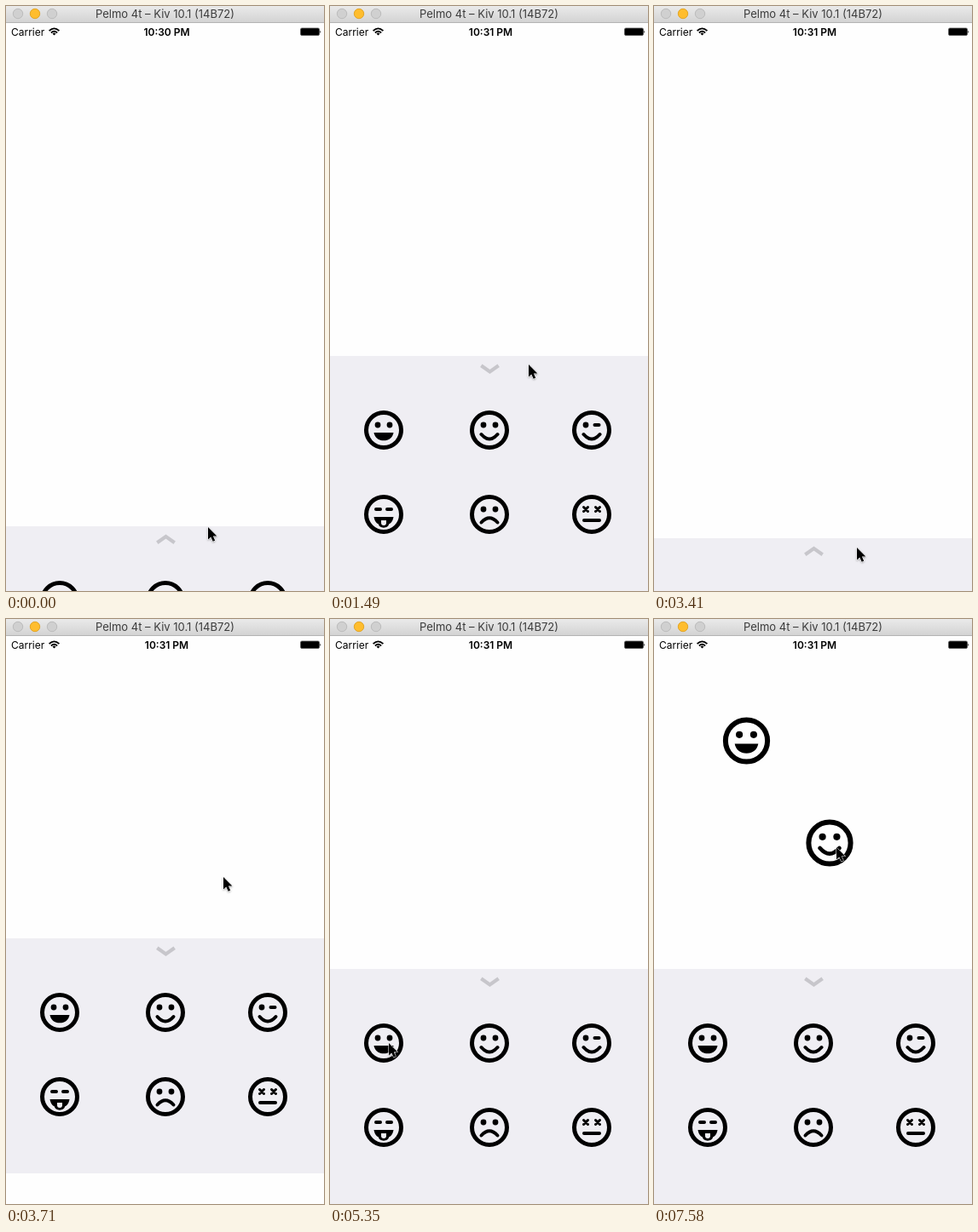
Animation of 373 by 687 pixels, one loop 8000 ms. Source, as an HTML page:

```html
<!DOCTYPE html>
<html lang="en">
<head>
<meta charset="utf-8">
<title>Sticker tray</title>
<style>
  html, body { margin: 0; width: 100%; height: 100%; overflow: hidden; background: #fefefe; }
  svg { display: block; width: 100%; height: 100%; }
  text { font-family: Inter, Roboto, sans-serif; font-size: 12px; }
  .line { fill: none; stroke: #000; stroke-width: 4; stroke-linecap: round; }
</style>
</head>
<body>
<svg viewBox="0 0 373 687">
  <defs>
    <linearGradient id="bar" x2="0" y2="1">
      <stop offset="0" stop-color="#eaeaea"/>
      <stop offset="1" stop-color="#d2d2d2"/>
    </linearGradient>
    <filter id="shadow" x="-50%" y="-50%" width="200%" height="200%">
      <feDropShadow dx="0" dy="1" stdDeviation=".8" flood-opacity=".35"/>
    </filter>

    <circle id="ring" r="20.5" fill="none" stroke="#000" stroke-width="5"/>
    <g id="eyes"><circle cx="-7" cy="-6" r="3.4"/><circle cx="7" cy="-6" r="3.4"/></g>
    <path id="smile" class="line" d="M-9.5 5Q0 16 9.5 5"/>

    <g id="grin"><use href="#ring"/><use href="#eyes"/><path d="M-11.5 3H11.5C10.5 9 6 12.3 0 12.3S-10.5 9-11.5 3Z"/></g>
    <g id="happy"><use href="#ring"/><use href="#eyes"/><use href="#smile"/></g>
    <g id="wink"><use href="#ring"/><circle cx="-7" cy="-6" r="3.4"/><path class="line" d="M3.5-6H8.5"/><use href="#smile"/></g>
    <g id="tongue">
      <use href="#ring"/>
      <path class="line" d="M-9-6H-4M4-6H9"/>
      <path d="M-11.5 3H11.5C10.5 8 9 10 6 11.5C5.5 17-5.5 17-6 11.5C-9 10-10.5 8-11.5 3Z"/>
      <path d="M-3 7H3V10A3 3 0 0 1-3 10Z" fill="#efeef3"/>
    </g>
    <g id="sad"><use href="#ring"/><use href="#eyes"/><path class="line" d="M-9.5 9.5Q0-1 9.5 9.5"/></g>
    <g id="dizzy">
      <use href="#ring"/>
      <path class="line" stroke-width="3" style="stroke-width:3" d="M-9.5-8.5l5 5m0-5l-5 5M4.5-8.5l5 5m0-5l-5 5"/>
      <path class="line" d="M-9 7H9"/>
    </g>
  </defs>

  <rect width="373" height="687" fill="#fefefe"/>

  <g id="tray">
    <rect width="373" height="276" fill="#efeef3"/>
    <path id="chevron" d="M-10.2 4L0-3.2L10.2 4" fill="none" stroke="#c7c6cb" stroke-width="4.2"/>
  </g>

  <use id="first" href="#grin"/>
  <use id="second" href="#happy"/>

  <rect width="373" height="20" fill="url(#bar)"/>
  <rect y="19" width="373" height="1" fill="#b4b4b4"/>
  <g stroke-width="1">
    <circle cx="14" cy="9" r="5.7" fill="#d0d0d0" stroke="#bcbcbc"/>
    <circle cx="34" cy="9" r="5.7" fill="#ffbd2e" stroke="#e2a526"/>
    <circle cx="54" cy="9" r="5.7" fill="#d0d0d0" stroke="#bcbcbc"/>
  </g>
  <text x="186.5" y="14" text-anchor="middle" fill="#3c3c3c" style="font-size:13px">Pelmo 4t – Kiv 10.1 (14B72)</text>

  <text x="6" y="34.5">Carrier</text>
  <g fill="none" stroke="#000" stroke-width="1.8">
    <path d="M50.6 29.2Q56.5 23.6 62.4 29.2M52.9 31.5Q56.5 28 60.1 31.5"/>
    <path d="M54.5 32.4Q56.5 30.8 58.5 32.4L56.5 34.6Z" fill="#000" stroke="none"/>
  </g>
  <text id="clock" x="188.5" y="34.5" text-anchor="middle" font-weight="600"></text>
  <rect x="345.5" y="26" width="22" height="8.5" rx="1.5" fill="#000" stroke="#555" stroke-width=".8"/>
  <path d="M368.4 28.4Q370.2 30.2 368.4 32.2Z"/>

  <path id="cursor" d="M0 0V14.5L3.3 11.4L5.7 16.8L8.2 15.7L5.9 10.4H10.4Z" stroke="#fff" stroke-width="1" paint-order="stroke" filter="url(#shadow)"/>
</svg>
<script>
const LOOP = 8000, TICK = 148.6;
const $ = id => document.getElementById(id);

const faces = ['grin', 'happy', 'wink', 'tongue', 'sad', 'dizzy'];
const cols = [63, 187, 307];
faces.forEach((face, i) => {
  const use = document.createElementNS('http://www.w3.org/2000/svg', 'use');
  use.setAttribute('href', '#' + face);
  use.setAttribute('x', cols[i % 3]);
  use.setAttribute('y', i < 3 ? 87 : 186);
  $('tray').append(use);
});

// Keys: [tick, value...]
const trayKeys = [
  [0, 611], [4, 501], [6, 428], [7, 411], [11, 411], [12, 416], [14, 452],
  [15, 605], [16, 651], [22, 651], [23, 625], [24, 450], [25, 375], [26, 411]
];
const cursorKeys = [
  [0, 237, 612], [4, 234, 500], [6, 234, 428], [7, 234, 408], [8, 234, 408],
  [9, 228, 397], [10, 233, 421], [11, 233, 421], [14, 234, 460], [16, 234, 460],
  [19, 233, 635], [21, 236, 662], [22, 236, 662], [23, 238, 636], [24, 247, 440],
  [25, 255, 303], [27, 255, 303], [28, 254, 303], [29, 254, 303], [30, 182, 376],
  [31, 182, 376], [32, 165, 375], [36, 69, 498], [37, 69, 498], [38, 86, 440],
  [39, 101, 290], [40, 116, 150], [41, 118, 132], [42, 128, 230], [43, 155, 400],
  [44, 175, 505], [45, 197, 490], [48, 208, 350], [50, 214, 282], [51, 214, 268]
];

function at(keys, n) {
  const i = keys.findIndex(k => k[0] > n);
  if (i < 0) return keys[keys.length - 1].slice(1);
  const [a, b] = [keys[i - 1], keys[i]];
  const p = (n - a[0]) / (b[0] - a[0]);
  return a.slice(1).map((v, j) => v + (b[j + 1] - v) * p);
}

const place = (id, x, y, extra = '') =>
  $(id).setAttribute('transform', `translate(${x} ${y}) ${extra}`);

// A sticker follows the cursor from pick-up to drop, then stays.
function drag(id, n, from, to, dx, dy) {
  $(id).setAttribute('visibility', n < from ? 'hidden' : 'visible');
  const [x, y] = at(cursorKeys, Math.min(n, to));
  place(id, x + dx, y + dy, 'scale(1.2)');
}

function draw(t) {
  const n = Math.floor((t + 10) / TICK);
  const [x, y] = at(cursorKeys, n);
  const down = (n >= 7 && n < 17) || n >= 25;
  place('tray', 0, at(trayKeys, n)[0]);
  place('chevron', 187.5, 15.3, down ? 'scale(1 -1)' : '');
  place('cursor', x, y);
  drag('first', n, 38, 41, -9.5, 11);
  drag('second', n, 45, 51, -8, -5);
  $('clock').textContent = n < 2 ? '10:30 PM' : '10:31 PM';
}

const start = performance.now();
function loop() {
  draw((performance.now() - start) % LOOP);
  requestAnimationFrame(loop);
}
loop();
</script>
</body>
</html>
```
